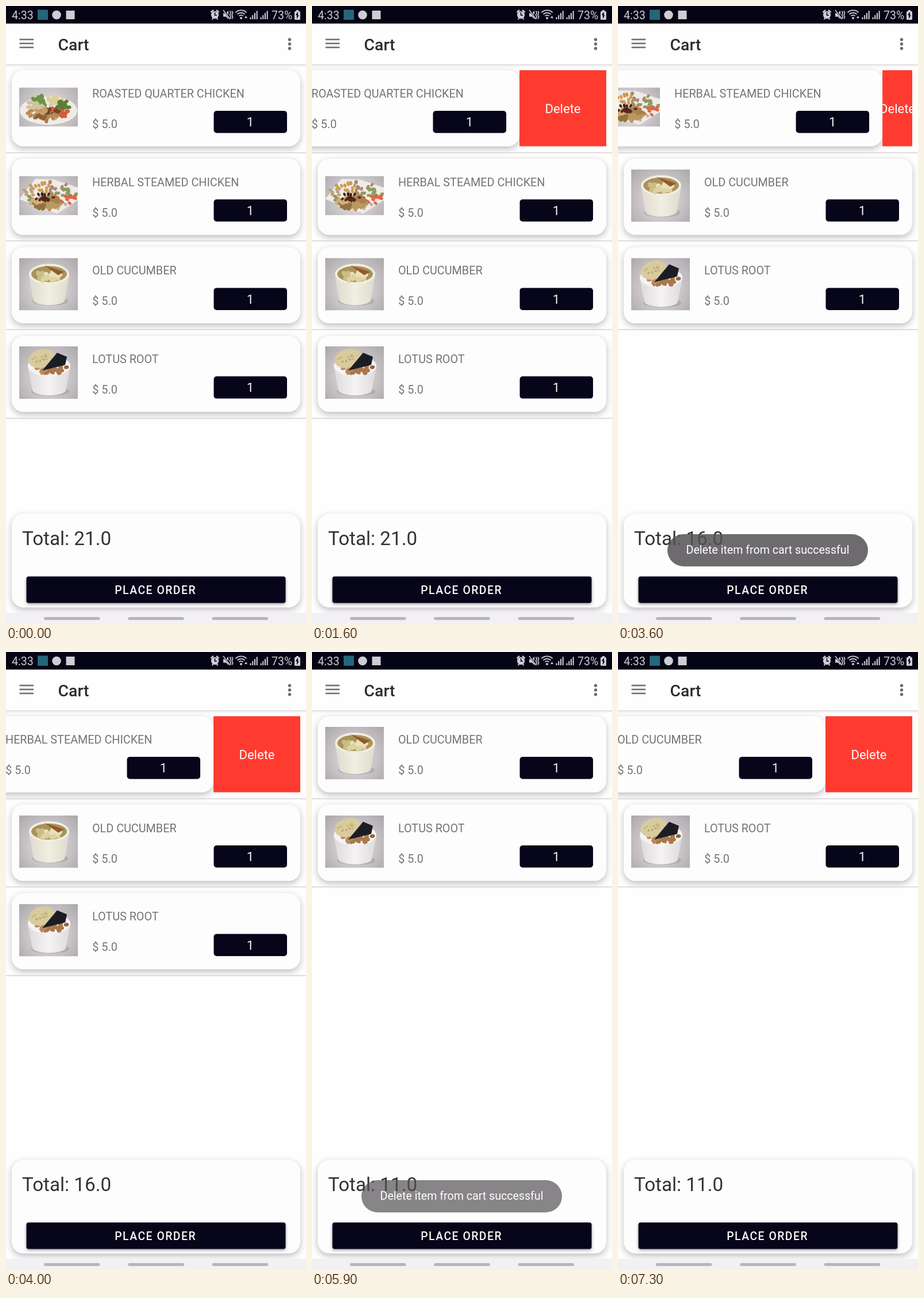
An HTML page with a canvas that plays this animation: 522x1073 px, repeating every 8000 ms.

```html
<!DOCTYPE html>
<html lang="en">
<head>
<meta charset="utf-8">
<title>Cart</title>
<style>
  html, body { margin: 0; width: 100%; height: 100%; overflow: hidden; background: #fefefe; }
  canvas { display: block; }
  #toast {
    position: absolute; left: 86px; top: 917px; width: 349px; height: 56px;
    border-radius: 28px; background: #565257; color: #fff; opacity: 0;
    font: 19.6px/56px Roboto, "Noto Sans", sans-serif; text-align: center; white-space: nowrap;
  }
</style>
</head>
<body>
<canvas id="stage" width="522" height="1073"></canvas>
<div id="toast">Delete item from cart successful</div>
<script>
const ctx = document.getElementById('stage').getContext('2d');
const toast = document.getElementById('toast');
const W = 522, H = 1073, LOOP = 8000, TICK = 100;
const BAR = '#050414', NAVY = '#070519', GREY = '#747474', ICON = '#cdcdd3';
const EDGE = 10, CARD_W = W - 2 * EDGE, CARD_H = 132.4;
const ROW_TOP = 111.3, PITCH = 153.7, OPEN = 151;

const items = [
  { name: 'ROASTED QUARTER CHICKEN', photo: plate, h: 68 },
  { name: 'HERBAL STEAMED CHICKEN', photo: tray, h: 68 },
  { name: 'OLD CUCUMBER', photo: soup, h: 91 },
  { name: 'LOTUS ROOT', photo: lotus, h: 91 }
];

// swipe: row starts to slide, tap: button goes away, drop: row leaves the list
const rounds = [
  { swipe: 205, tap: 2300, drop: 2400 },
  { swipe: 3505, tap: 5100, drop: 5500 },
  { swipe: 6605, tap: LOOP, drop: LOOP }
];
const notices = [{ show: 2435, hide: 3530 }, { show: 5435, hide: 6630 }];

const clamp = v => Math.max(0, Math.min(1, v));
const lerp = (a, b, u) => a + (b - a) * u;
const easeOut = u => 1 - (1 - u) ** 2;
const times = (n, fn) => Array.from({ length: n }, (_, i) => fn(i));

function box(color, x, y, w, h, r = 0) {
  ctx.fillStyle = color;
  ctx.beginPath();
  ctx.roundRect(x, y, w, h, r);
  ctx.fill();
}

function oval(color, x, y, rx, ry = rx, turn = 0) {
  ctx.fillStyle = color;
  ctx.beginPath();
  ctx.ellipse(x, y, rx, ry, turn, 0, 7);
  ctx.fill();
}

function trace(points) {
  ctx.beginPath();
  points.forEach(([x, y]) => ctx.lineTo(x, y));
}

function poly(color, ...points) {
  ctx.fillStyle = color;
  trace(points);
  ctx.fill();
}

function line(color, width, ...points) {
  ctx.strokeStyle = color;
  ctx.lineWidth = width;
  trace(points);
  ctx.stroke();
}

function text(str, x, y, size, color, { align = 'left', weight = 400, spacing = 0 } = {}) {
  ctx.font = `${weight} ${size}px Roboto, "Noto Sans", sans-serif`;
  ctx.letterSpacing = spacing + 'px';
  ctx.textAlign = align;
  ctx.fillStyle = color;
  ctx.fillText(str, x, y);
}

function raised(alpha, blur, dy, ...shape) {
  ctx.save();
  ctx.shadowColor = `rgba(20,10,30,${alpha})`;
  ctx.shadowBlur = blur;
  ctx.shadowOffsetY = dy;
  box(...shape);
  ctx.restore();
}

function clipped(x, y, w, h, paint) {
  ctx.save();
  ctx.beginPath();
  ctx.rect(x, y, w, h);
  ctx.clip();
  ctx.translate(x, y);
  paint();
  ctx.restore();
}

let seed;
const rnd = () => (seed = (seed * 16807) % 2147483647) / 2147483647;

// seeded food bits; the colours go clockwise round the heap, from the right
function heap(colors, n, x, y, rx, ry, size) {
  for (let i = 0; i < n; i++) {
    const u = rnd(), a = u * 2 * Math.PI, d = Math.sqrt(rnd());
    oval(colors[Math.floor(u * colors.length)],
      x + Math.cos(a) * d * rx, y + Math.sin(a) * d * ry, size, size * 0.7, a);
  }
}

function backdrop(h) {
  const g = ctx.createRadialGradient(51, h * 0.6, 10, 51, h * 0.55, 70);
  g.addColorStop(0, '#e2dee0');
  g.addColorStop(1, '#aca7aa');
  box(g, 0, 0, 102, h);
}

function plate() {
  backdrop(68);
  oval('#c3bcbb', 51, 44, 49, 23);
  oval('#efebe8', 51, 40, 50, 25);
  heap(['#d65a3c', '#d8b48a', '#a87c48', '#b98d58', '#cfc3a0', '#6a9440', '#dccf9f', '#587f35'],
    120, 50, 36, 37, 22, 4.5);
  heap(['#b58a54', '#8c6236', '#c7a06a', '#70482a'], 40, 48, 46, 24, 9, 4);
}

function tray() {
  backdrop(68);
  poly('#efebe8', [0, 40], [28, 5], [60, 6], [102, 20], [102, 42], [66, 65]);
  heap(['#dd6647', '#bfb59c', '#7d9a4c', '#8d9a55', '#c0a070', '#cf9a50', '#a88a68', '#8a9c60'],
    90, 52, 34, 48, 24, 3.5);
  heap(['#b99862', '#94713f', '#cdb07c', '#a5834e'], 50, 46, 47, 25, 10, 5);
  heap(['#55261e', '#3b201a'], 20, 42, 37, 20, 6, 3);
}

// stacked ovals narrow from rim to base
function bowl(rim, rx, base, light, shade) {
  const g = ctx.createLinearGradient(52 - rx, 0, 52 + rx, 0);
  [shade, light, shade].forEach((c, i) => g.addColorStop(i / 2, c));
  oval('rgba(90,80,75,.2)', 54, base - 7, rx * 0.9, 8);
  for (let y = base - 9; y > rim; y--) {
    const u = (y - rim) / (base - 9 - rim);
    oval(g, 52, y, rx * (1 - 0.22 * u), lerp(18, 9, u));
  }
  oval(light, 52, rim, rx, 18);
}

function soup() {
  backdrop(91);
  bowl(28, 35, 82, '#f1eee2', '#dedace');
  oval('#a8935a', 52, 28, 31, 14);
  heap(['#ddd2a0', '#cbbd84', '#e9e1bd'], 30, 50, 31, 22, 7, 6);
  poly('#96582a', [44, 13], [78, 24], [68, 30]);
}

function lotus() {
  backdrop(91);
  bowl(34, 37, 85, '#f5f3f3', '#dddadb');
  heap(['#a9784c', '#b98a5c', '#8f6340'], 60, 56, 36, 28, 12, 4);
  oval('#d8cb9c', 39, 21, 23, 16, -0.3);
  heap(['#b5a470', '#c3b482'], 12, 37, 22, 15, 10, 2.2);
  poly('#1c1d24', [40, 42], [66, 11], [83, 18], [80, 32]);
}

function card(item, i, x, y) {
  raised(0.28, 12, 4, '#fdfdfd', x + EDGE, y, CARD_W, CARD_H, 20);
  seed = item.name.length;
  clipped(x + 23, y + (CARD_H - item.h) / 2 - 2, 102, item.h, item.photo);
  text(item.name, x + 150, y + 47.7, 19.8, GREY);
  text('$ 5.0', x + 150.3, y + 100.5, 19.8, GREY);
  box(NAVY, x + 361.5, y + 70.7, 127.5, 38.5, 5);
  text('1', x + 425, y + 98, 22, '#f4f4f8', { align: 'center' });
}

function deleteButton(width) {
  clipped(W - EDGE - width, ROW_TOP, width, CARD_H, () => {
    box('#ff3b30', 0, 0, width, CARD_H);
    text('Delete', width / 2, 74.2, 22, '#fff', { align: 'center' });
  });
}

function list(t, gone) {
  const { swipe, tap } = rounds[gone];
  const slide = OPEN * easeOut(clamp((t - swipe) / 500));
  items.slice(gone).forEach((item, i) => {
    const y = ROW_TOP + i * PITCH;
    card(item, i, i ? 0 : -slide, y);
    box('#d5d2d7', 0, Math.round(y + 142.4), W, 1.6);
  });
  if (t < tap) deleteButton(slide);
}

function appBar() {
  raised(0.22, 5, 1, '#fefefe', -EDGE, 30, W + 2 * EDGE, 71);
  for (let i = -1; i <= 1; i++) {
    box('#707072', 23.5, 63.7 + i * 6.9, 24.5, 2.6);
    oval('#6c6c6e', 493.5, 66 + i * 7.7, 2.7);
  }
  text('Cart', 90.6, 76.8, 28.3, '#2c2a2e', { weight: 500 });
}

function alarm(x, y) {
  for (const s of [-1, 1]) {
    line(ICON, 2.4, [x + s * 7, y - 4.5], [x + s * 2.5, y - 8.5]);
    line(ICON, 2, [x + s * 5, y + 8], [x + s * 2.5, y + 4.5]);
  }
  oval(ICON, x, y, 6.6);
  line(BAR, 1.6, [x, y - 4.5], [x, y + 0.5], [x + 3.5, y + 0.5]);
}

function muted(x, y) {
  box(ICON, x, y - 3, 5, 6);
  poly(ICON, [x + 2, y], [x + 9, y - 7.5], [x + 9, y + 7.5]);
  line(BAR, 3.2, [x, y - 8.5], [x + 13, y + 7.5]);
  line(ICON, 1.5, [x, y - 8.5], [x + 12, y + 7.5]);
  for (const dx of [11.5, 15]) {
    line(ICON, 1.7, ...times(5, i => [x + dx + (i % 2) * 1.6, y - 7 + i * 3.5]));
  }
}

function wireless(x, y) {
  ctx.strokeStyle = ICON;
  ctx.lineWidth = 1.9;
  for (let r = 5; r < 15; r += 4.3) {
    ctx.beginPath();
    ctx.arc(x, y, r, -2.35, -0.79);
    ctx.stroke();
  }
  oval(ICON, x, y, 2);
  poly(ICON, [x + 6, y], [x + 8.5, y - 4], [x + 11, y]);
}

function signal(x) {
  times(4, i => box(ICON, x + i * 3.7, 19.5 - i * 3.7, 2.1, 3.5 + i * 3.7));
}

function battery(x, y) {
  box(ICON, x - 2, y - 9, 4, 3);
  box(ICON, x - 5, y - 7, 10, 15, 1.5);
  for (const s of [-1, 1]) poly(BAR, [x - s, y + s * 6], [x + s * 3, y - 0.5], [x - s, y + 1]);
}

function statusBar() {
  box(BAR, 0, 0, W, 30.5);
  text('4:33', 10, 22.5, 19.6, ICON);
  box('#23677b', 55, 6.5, 18, 17.5);
  oval(ICON, 88, 15.5, 7.8);
  box(ICON, 104.5, 8, 15, 15);
  alarm(363.5, 15.5);
  muted(378, 15.5);
  wireless(409, 21);
  signal(424.5);
  signal(442.5);
  text('73%', 462, 22.5, 19.6, ICON);
  battery(507, 16);
}

function footer(total) {
  raised(0.28, 12, 4, '#fdfdfd', EDGE, 881.7, CARD_W, 162.5, 20);
  text('Total: ' + total.toFixed(1), 28, 935.5, 33.2, '#333135');
  raised(0.4, 5, 2, NAVY, 35.5, 990.5, 451, 46, 4);
  text('PLACE ORDER', 189.2, 1020.7, 19.3, '#f8f8fb', { weight: 500, spacing: 1.55 });
  box('#f2f0f3', 0, 1053.5, W, 20);
  times(3, i => box('#b8b5b9', 66 + i * 146.3, 1061, 97.5, 5, 2.5));
}

function toastAlpha(t) {
  return Math.max(...notices.map(({ show, hide }) =>
    Math.min(clamp((t - show) / 665), 1 - clamp((t - hide) / 470))));
}

function draw(t) {
  const gone = rounds.filter(r => t >= r.drop).length;
  box('#fefefe', 0, 0, W, H);
  list(t, gone);
  appBar();
  statusBar();
  footer(21 - 5 * gone);
  toast.style.opacity = toastAlpha(t);
}

let start;
function frame(now) {
  start ??= now;
  const t = (now - start) % LOOP;
  draw(Math.floor(t / TICK + 1e-6) * TICK);
  requestAnimationFrame(frame);
}
draw(0);
requestAnimationFrame(frame);
</script>
</body>
</html>
```
